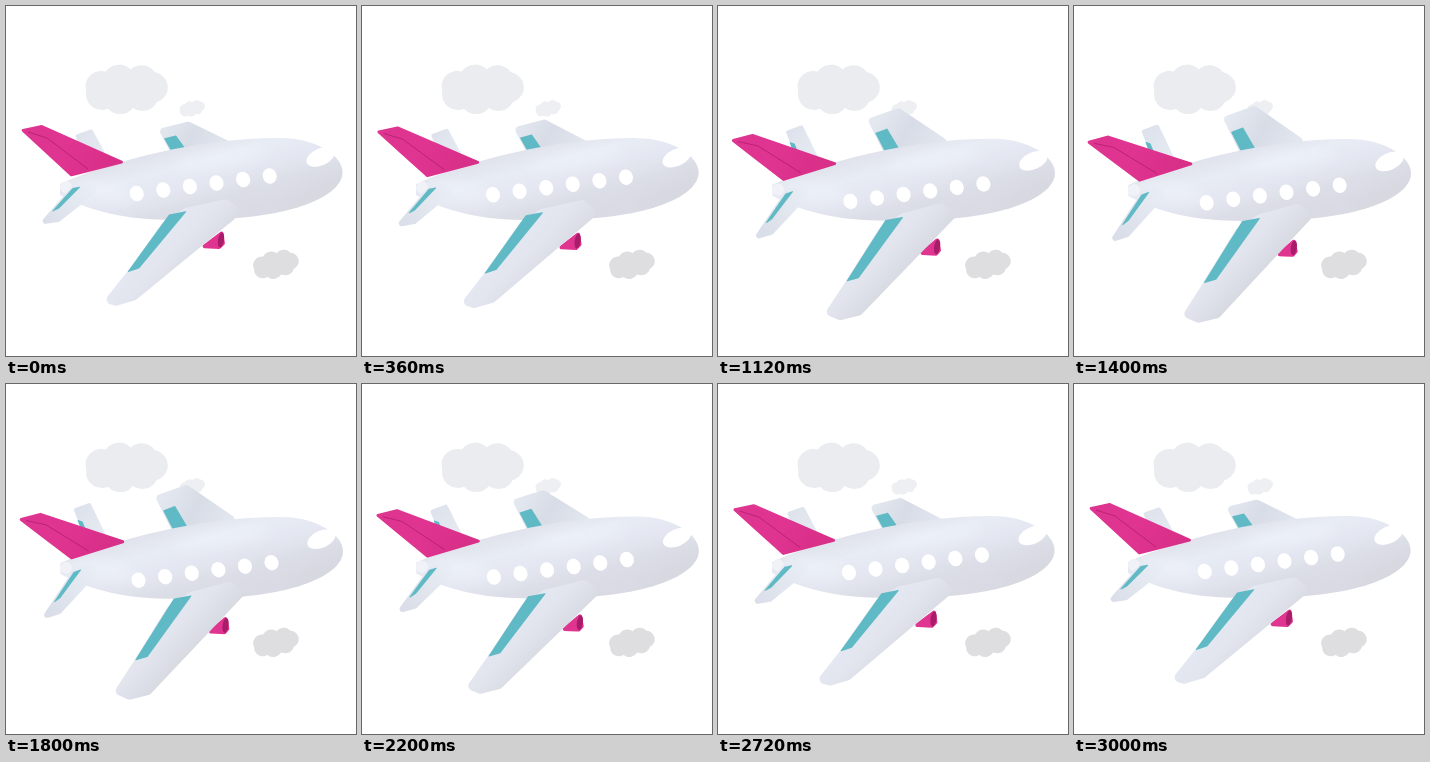
These frames come from a looping animation (350 by 350 pixels, 3040 ms). An HTML page with a canvas:

```html
<!DOCTYPE html>
<html lang="en">
<head>
<meta charset="utf-8">
<title>Plane</title>
<style>
  html, body { margin: 0; width: 100%; height: 100%; overflow: hidden; background: #fff; }
  canvas { display: block; width: 350px; height: 350px; }
</style>
</head>
<body>
<canvas id="stage" width="350" height="350"></canvas>
<script>
const ctx = document.getElementById('stage').getContext('2d');
const LOOP = 3040, STEP = 40;
const PINK = '#df3490', DARK_PINK = '#a81c69', TEAL = '#60bac5';
let roll = 0;

const mix = (a, b, k) => a + (b - a) * k;

// A swing moves points with the roll: by rootShift at the root, by tipShift at the
// tip, evenly in between; spread widens the part around its axis towards the tip.
function swing(root, tip, rootShift, tipShift, spread = 0) {
  const ax = tip[0] - root[0], ay = tip[1] - root[1];
  return ([x, y]) => {
    const k = ((x - root[0]) * ax + (y - root[1]) * ay) / (ax * ax + ay * ay);
    const offX = x - root[0] - ax * k, offY = y - root[1] - ay * k;
    return [x + roll * (mix(rootShift[0], tipShift[0], k) + offX * spread * k),
            y + roll * (mix(rootShift[1], tipShift[1], k) + offY * spread * k)];
  };
}

const moves = {
  farTail: swing([85, 148], [78, 125], [1, 4], [-2, -5]),
  farWing: swing([190, 146], [190, 116], [2, 1], [-1.5, -16], 0.1),
  fin: swing([92, 163], [25, 121], [1, 3.5], [-2, 11.5]),
  nearTail: swing([75, 181], [42, 218], [1, 5], [2, 17]),
  nearWing: swing([210, 205], [112, 298], [5, 6], [14, 17], 0.4),
  engine: swing([218, 226], [200, 242], [4, 8], [7, 8])
};

function gradient(x0, y0, x1, y1, ...colors) {
  const g = ctx.createLinearGradient(x0, y0, x1, y1);
  colors.forEach((c, i) => g.addColorStop(i / (colors.length - 1), c));
  return g;
}

function panel(move, points, radius, fill) {
  const pts = points.map(move), n = pts.length;
  const [a, b] = [pts[n - 1], pts[0]];
  ctx.beginPath();
  ctx.moveTo((a[0] + b[0]) / 2, (a[1] + b[1]) / 2);
  pts.forEach((p, i) => ctx.arcTo(...p, ...pts[(i + 1) % n], radius));
  ctx.closePath();
  ctx.fillStyle = fill;
  ctx.fill();
}

function line(move, points, color, width) {
  ctx.beginPath();
  points.map(move).forEach(p => ctx.lineTo(...p));
  ctx.strokeStyle = color;
  ctx.lineWidth = width;
  ctx.stroke();
}

function oval(x, y, rx, ry, angle, fill) {
  ctx.beginPath();
  ctx.ellipse(x, y, rx, ry, angle, 0, Math.PI * 2);
  ctx.fillStyle = fill;
  ctx.fill();
}

// A ring of seven puffs around a filled middle.
function cloud(x, y, scale, tilt, fill) {
  ctx.save();
  ctx.translate(x, y);
  ctx.rotate(tilt);
  ctx.scale(scale, scale);
  oval(0, 0, 30, 18, 0, fill);
  for (let i = 0; i < 7; i++) {
    const a = i / 7 * Math.PI * 2;
    oval(26 * Math.cos(a), 9.5 * Math.sin(a), 15.5, 15, 0, fill);
  }
  ctx.restore();
}

function farSide() {
  panel(moves.farTail, [[69, 129], [86, 123], [99, 147], [80, 155]], 2,
    gradient(68, 125, 98, 148, '#dce1eb', '#e6eaf2'));
  panel(moves.farTail, [[72, 137], [77, 138], [81, 147], [76, 147]], 0.5, TEAL);
  panel(moves.farWing, [[152, 123], [183, 115.5], [229, 138], [205, 152], [166, 149]], 4,
    gradient(155, 112, 218, 146, '#e4e9f1', '#d8dce6', '#e2e6ef'));
  panel(moves.farWing, [[158, 132.5], [170, 129.5], [182, 146], [167, 148]], 0.5, TEAL);
}

function engine() {
  panel(moves.engine, [[193, 242], [217, 224], [219, 238], [214, 243]], 2, PINK);
  oval(...moves.engine([215, 234]), 3, 7.5, 0.15, DARK_PINK);
}

function fuselage() {
  const drop = roll;
  ctx.save();
  ctx.translate(0.5 * roll, drop);
  ctx.beginPath();
  ctx.moveTo(54, 178);
  ctx.bezierCurveTo(105, 155, 195, 131.5, 275, 132);
  ctx.bezierCurveTo(310, 132, 337, 150, 336.5, 166);
  ctx.bezierCurveTo(337, 190, 285, 213, 200, 213);
  ctx.bezierCurveTo(130, 217, 90, 208, 54, 189);
  ctx.closePath();
  ctx.fillStyle = gradient(180, 138, 202, 216, '#e0e3eb', '#e8ecf5', '#e4e7f1', '#dcdee7', '#d9dae3');
  ctx.fill();

  ctx.clip();
  ctx.filter = 'blur(7px)';
  oval(215, 153, 50, 6, -0.17, 'rgba(242,246,253,.65)');
  oval(95, 184, 36, 9, 0.2, 'rgba(240,245,252,.55)');
  oval(315, 186, 34, 9, -0.55, 'rgba(214,215,222,.6)');
  ctx.restore();
  oval(60, 181 + 3 * roll, 6, 6, 0, '#f0f2f8');
}

function windows() {
  for (let i = 0; i < 6; i++) {
    oval(130.7 + 26.6 * i + 2 * roll, 187.5 - 3.5 * i + 9.4 * roll, 7, 7.8, -0.3, '#fff');
  }
  oval(314.5 + roll, 151 + 4.5 * roll, 15, 8.5, -0.42, '#fff');
}

function fin() {
  panel(moves.fin, [[14, 123.5], [36, 119], [120, 156.5], [65, 170.5]], 1.5,
    gradient(20, 125, 95, 172, '#dd3590', '#e03491', '#d82f88'));
  line(moves.fin, [[22, 126], [41, 132], [82, 163]], 'rgba(150,14,94,.5)', 1);
}

function nearSide() {
  panel(moves.nearTail, [[32, 219], [53, 216], [90, 187], [88, 177], [68, 178]], 3,
    gradient(40, 218, 88, 183, '#dadee8', '#e2e6ef', '#e9edf6'));
  panel(moves.nearTail, [[45, 206.5], [53, 202.5], [75, 180.5], [66.5, 182]], 0.5, TEAL);

  panel(moves.nearWing, [[97, 296], [110, 300], [130, 294], [237, 206], [221, 193],
    [179, 202], [157, 216], [121, 266]], 5,
    gradient(145, 230, 185, 268, '#e5e9f3', '#e2e5ee', '#d8dae2'));
  panel(moves.nearWing, [[121, 266.5], [133, 262.5], [181, 205], [163, 208.5]], 0.5, TEAL);
}

function render(now) {
  let t = Math.floor((now % LOOP) / STEP) * STEP;
  if (t % 200 === STEP) t -= STEP; // every fifth step repeats the one before
  roll = (1 - Math.cos(t / LOOP * Math.PI * 2)) / 2;

  ctx.fillStyle = '#fff';
  ctx.fillRect(0, 0, 350, 350);
  cloud(119.5, 83, 1.02, -0.06, '#ebecef');
  cloud(186, 102.5, 0.32, -0.25, '#eeeff2');
  cloud(269.5, 258.5, 0.57, -0.22, '#dedee0');
  farSide();
  engine();
  fuselage();
  fin();
  nearSide();
  windows();
}

const start = performance.now();
function tick() {
  render(performance.now() - start);
  requestAnimationFrame(tick);
}
tick();
</script>
</body>
</html>
```
